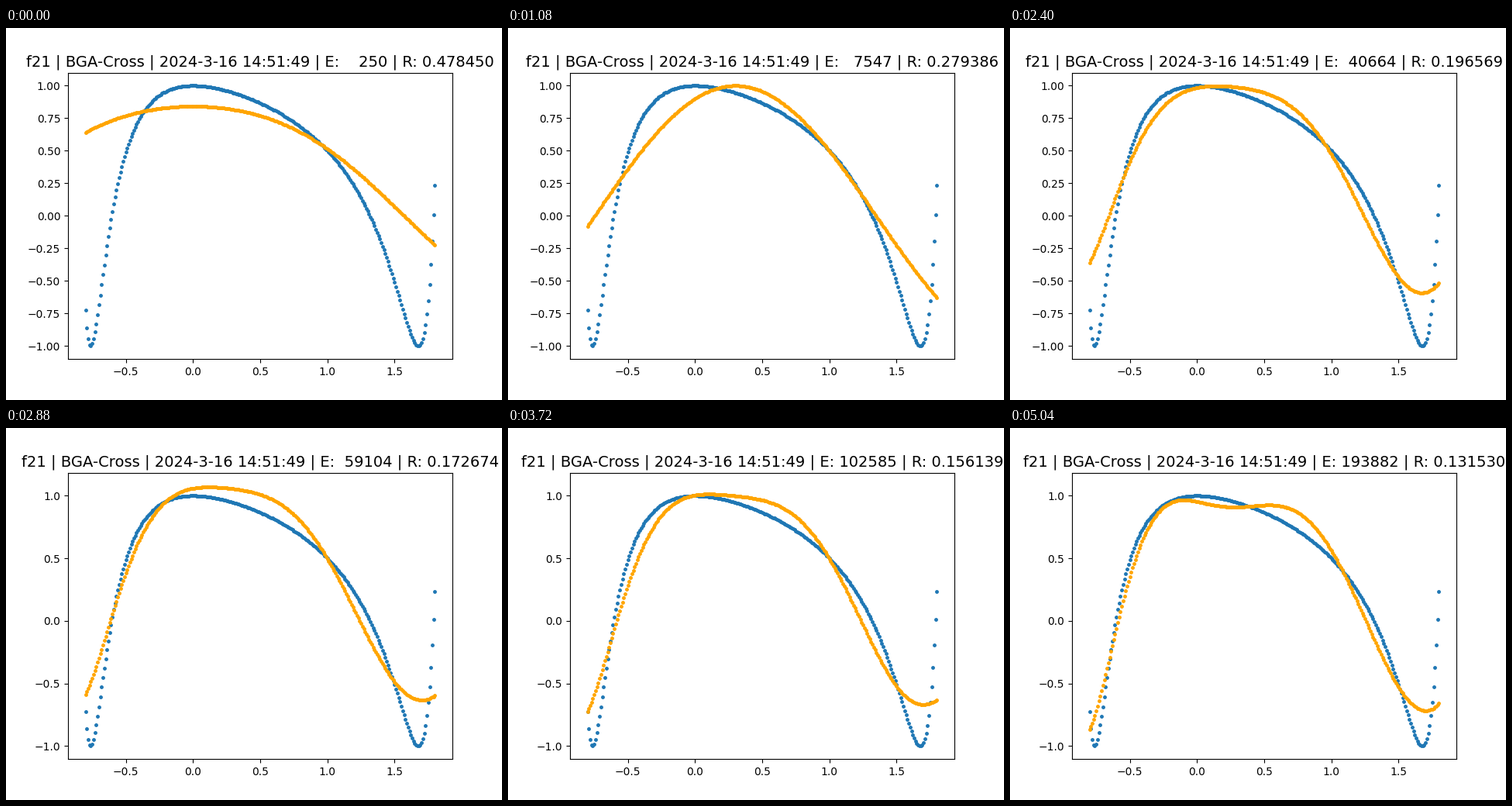
A matplotlib script that plays this animation: 640 by 480 pixels, repeating every 5160 ms.

```python
import numpy as np
import matplotlib.pyplot as plt
from matplotlib.animation import FuncAnimation

FRAMES, INTERVAL = 43, 120
RESCALE_AT = 22            # from here the y axis makes room for a taller peak
MID, HALF = .5, 1.3        # centre and half width of the x range
x = np.arange(-80, 181) / 100


def through(*ys):
    """Smooth curve through key points packed towards both ends."""
    n = len(ys) - 1
    knots = -np.cos(np.pi * np.arange(n + 1) / n)
    return np.polyval(np.polyfit(knots, ys, n), (x - MID) / HALF)


target = np.cos(np.pi / 6 + .9 * np.tan(1.054 * (x - MID)))
flat = through(-.218, 0, .62, .99, .957, .485, -.36, -.59, -.49)
tall = through(-.589, -.3, .6, 1.06, 1.01, .5, -.36, -.632, -.598)
low = through(-.725, -.43, .515, 1.005, .965, .5, -.39, -.668, -.632)
wavy = through(-.935, -.62, .58, .975, .925, .655, -.37, -.711, -.62)
last = through(-.868, -.52, .61, .953, .925, .565, -.375, -.717, -.66)

# Step, evaluations, residual, best candidate
KEYS = [
    (0, 250, .478450, np.sin(np.cos(x))),
    (4, 2246, .389977, .955 * np.cos(x ** 2)),
    (9, 7547, .279386, np.cos(1.5 * x - .45)),
    (10, 9488, .270562, np.cos(2.1 * (x - .3))),
    (15, 22470, .226444, flat),
    (21, 44946, .190594, .48 * (flat + tall)),
    (24, 59104, .172674, tall),
    (31, 102585, .156139, low),
    (35, 134016, .142017, wavy),
    (42, 193882, .131530, last),
]


def state(i):
    """Evaluations, residual and curve; evaluations grow quadratically."""
    a, b = next(pair for pair in zip(KEYS, KEYS[1:]) if i <= pair[1][0])
    t = (i - a[0]) / (b[0] - a[0])

    def mix(p, q):
        return (1 - t) * p + t * q

    evals = round(mix(a[1] ** .5, b[1] ** .5) ** 2)
    return evals, mix(a[2], b[2]), mix(a[3], b[3])


fig, ax = plt.subplots(figsize=(6.4, 4.8), dpi=100)
ax.plot(x, target, ".", ms=5, color="tab:blue")
dots, = ax.plot(x, KEYS[0][3], ".", ms=5, color="orange")
title = ax.set_title("", fontsize=14)
ax.set_xlim(MID - 1.1 * HALF, MID + 1.1 * HALF)


def update(i):
    evals, residual, curve = state(i)
    top = 1.0805 if i >= RESCALE_AT else 1
    pad = .05 * (top + 1)
    ax.set_ylim(-1 - pad, top + pad)
    dots.set_ydata(curve)
    title.set_text("f21 | BGA-Cross | 2024-3-16 14:51:49 | "
                   f"E: {evals:6d} | R: {residual:.6f}")
    return dots, title


anim = FuncAnimation(fig, update, frames=FRAMES, interval=INTERVAL,
                     repeat=True, repeat_delay=0, blit=False)
plt.show()
```
